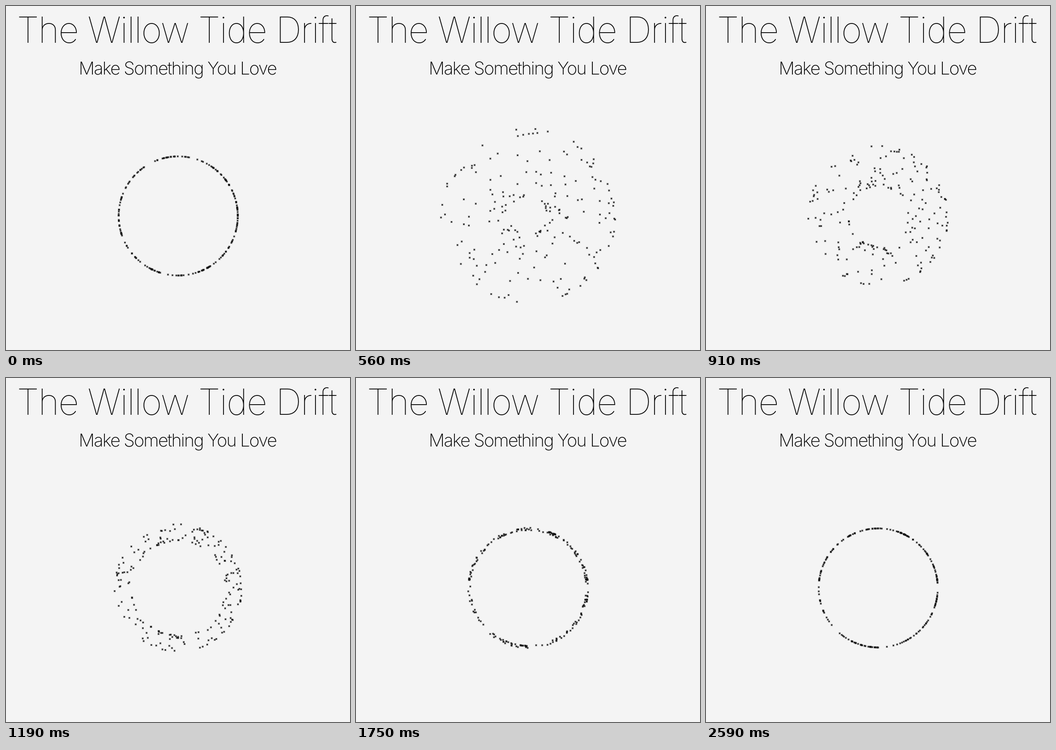
Write an HTML page with a canvas that moves like this. It is 748 px wide and 748 px high and loops after 2.66 s.

```html
<!DOCTYPE html>
<html lang="en">
<head>
<meta charset="utf-8">
<title>The Willow Tide Drift</title>
<style>
  html, body { margin: 0; width: 100%; height: 100%; overflow: hidden; background: #f4f4f4; }
  canvas { display: block; }
</style>
</head>
<body>
<canvas id="stage" width="748" height="748"></canvas>
<script>
const SIZE = 748, LOOP = 2660, STEP = 70, BURST = 60;
const CX = 374.5, CY = 456.5, RADIUS = 129.5, COUNT = 200;
const ctx = document.getElementById('stage').getContext('2d');

let seed = 41;
function random() {
  seed = (seed * 16807) % 2147483647;
  return seed / 2147483647;
}

const randomAngle = () => random() * 2 * Math.PI;
const dots = Array.from({ length: COUNT }, () => ({ start: randomAngle(), end: randomAngle() }));

function drawText(text, x, y, weight, size, spacing) {
  ctx.font = `${weight} ${size}px Inter, Roboto, sans-serif`;
  ctx.letterSpacing = `${spacing}px`;
  ctx.fillText(text, x, y);
}

function drawSquare(x, y, size, color) {
  ctx.fillStyle = color;
  ctx.fillRect(x - size / 2, y - size / 2, size, size);
}

function drawDot(x, y) {
  drawSquare(x, y, 4.8, 'rgba(0, 0, 0, .2)');
  drawSquare(x, y, 3, 'rgba(0, 0, 0, .8)');
}

function draw(ms) {
  ctx.fillStyle = '#f4f4f4';
  ctx.fillRect(0, 0, SIZE, SIZE);

  ctx.fillStyle = '#000';
  ctx.textAlign = 'center';
  drawText('The Willow Tide Drift', 371, 80, 140, 78, -1.6);
  drawText('Make Something You Love', 373, 149, 150, 38.5, -1.8);

  // A damped burst outwards along the old angle, settling on the new one.
  const t = Math.max(0, ms - BURST) / 1000;
  const outward = RADIUS * (1 + 12 * t) * Math.exp(-4.12 * t);
  const home = RADIUS * (1 - (1 + 3.85 * t) * Math.exp(-3.85 * t));
  for (const { start, end } of dots) {
    drawDot(
      CX + outward * Math.cos(start) + home * Math.cos(end),
      CY + outward * Math.sin(start) + home * Math.sin(end)
    );
  }
}

function tick() {
  const ms = performance.now() % LOOP;
  draw(Math.floor(ms / STEP) * STEP);
  requestAnimationFrame(tick);
}
tick();
</script>
</body>
</html>
```
